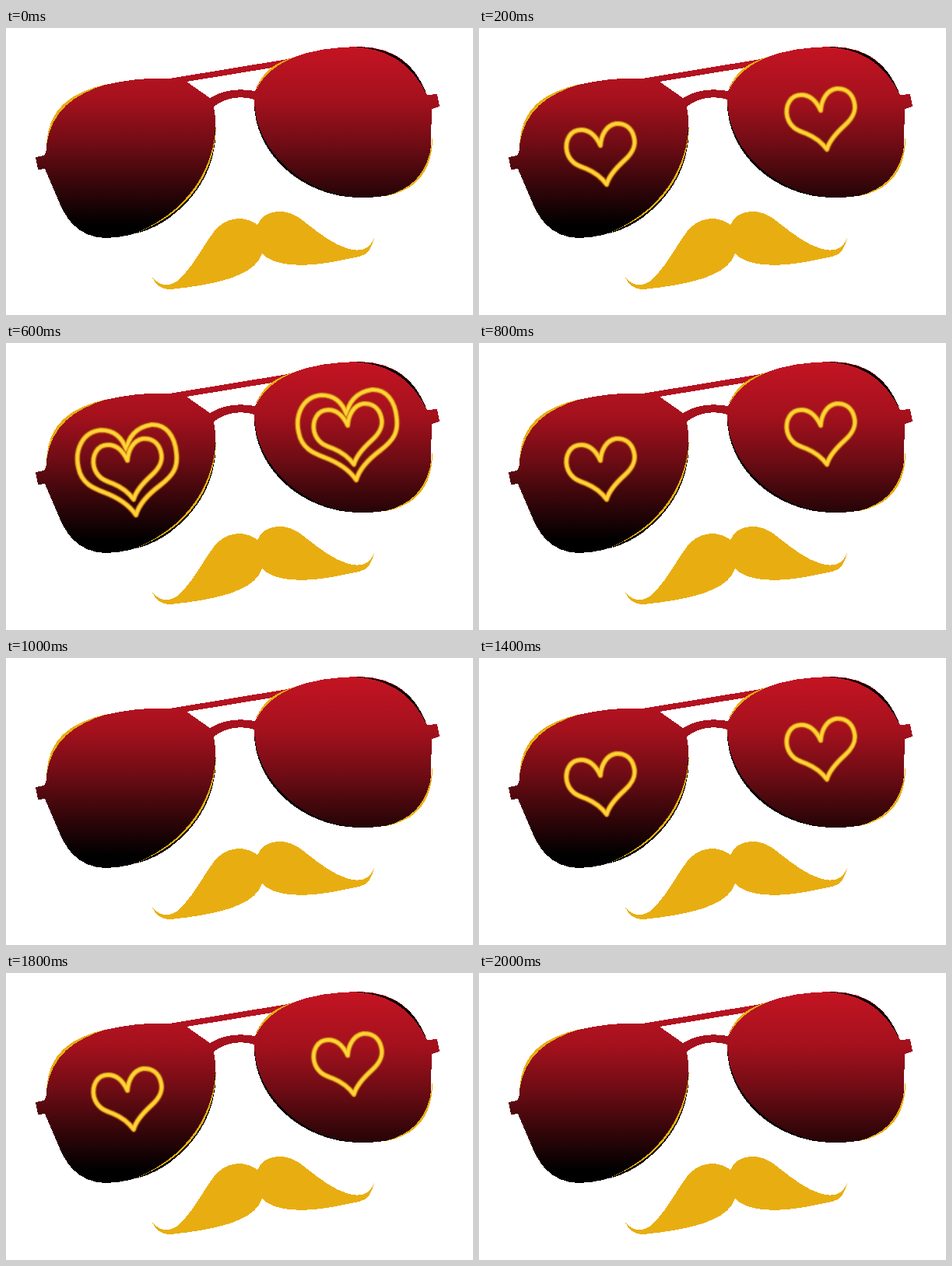
Recreate the animation shown at these times as an HTML page. Size 600x369 px, loop 2200 ms.

```html
<!DOCTYPE html>
<html lang="en">
<head>
<meta charset="utf-8">
<title>Heart sunglasses</title>
<style>
  html, body { margin: 0; width: 100%; height: 100%; overflow: hidden; background: #fff; }
  svg { display: block; width: 600px; height: 369px; }
  .gold { fill: #e8ae11; }
  .heart { fill: none; stroke-linejoin: round; }
</style>
</head>
<body>
<svg viewBox="0 0 600 369">
  <defs>
    <linearGradient id="tint" gradientUnits="userSpaceOnUse" x1="0" y1="24" x2="0" y2="254">
      <stop offset="0" stop-color="#c41423"/>
      <stop offset=".3" stop-color="#a4111d"/>
      <stop offset=".55" stop-color="#6e0c14"/>
      <stop offset=".7" stop-color="#47080d"/>
      <stop offset="1" stop-color="#000"/>
    </linearGradient>
    <path id="smallShape" d="M156 151 C150 138 142 131 131 131 C117 131 110 145 113 159 C117 174 128 177 138 181 C150 186 158 193 164 201 C167 190 176 180 187 170 C198 160 202 151 199 140 C196 128 187 122 176 123 C164 125 157 137 156 151Z"/>
    <path id="largeShape" d="M155 138 C149 120 137 112 122 112 C98 114 88 138 93 160 C97 181 113 187 126 192 C142 198 158 208 167 221 C171 207 182 195 198 183 C215 170 221 160 219 142 C217 119 205 104 187 105 C167 108 156 122 155 138Z"/>
    <g id="small" class="heart">
      <use href="#smallShape" stroke="#a85a18" stroke-opacity=".5" stroke-width="8.5"/>
      <use href="#smallShape" stroke="#ec9f1c" stroke-width="6"/>
      <use href="#smallShape" stroke="#ffd637" stroke-width="3.4"/>
    </g>
    <g id="large" class="heart">
      <use href="#largeShape" stroke="#a85a18" stroke-opacity=".5" stroke-width="8.5"/>
      <use href="#largeShape" stroke="#ec9f1c" stroke-width="6"/>
      <use href="#largeShape" stroke="#ffd637" stroke-width="3.4"/>
    </g>
  </defs>

  <g shape-rendering="crispEdges">
    <!-- frame and lenses, with the gap between the bars cut out -->
    <path fill="url(#tint)" fill-rule="evenodd" d="M38 166 L48 164 Q52 162 52 152 C54 104 82 83 128 73 C157 66 184 64 210 65 L362 40 C392 28 424 24 455 24 C503 25 527 50 541 86 L554 85 L557 101 L547 104 L546 145 C546 187 525 218 460 218 C380 218 318 160 319 92 C304 87 284 88 267 101 C277 158 258 208 210 244 C182 262 153 270 127 270 C99 269 82 253 71 230 L50 181 L41 182Z
      M232 69 L262 90 C282 78 301 78 320 81 C325 68 331 58 342 51Z"/>
    <!-- dark rims -->
    <path d="M319 95 C318 160 380 218 455 218 C384 215 321 160 319 95Z"/>
    <path d="M269 120 C273 168 253 212 210 244 C195 255 180 261 163 266 C240 238 270 180 269 120Z"/>
    <path d="M445 24 C503 24 527 50 541 86 C524 53 500 27 445 24Z"/>
    <!-- gold rims -->
    <path class="gold" d="M52 150 C54 104 82 83 130 72 C86 86 59 106 52 150Z"/>
    <path class="gold" d="M270 124 C270 180 240 238 163 265 C235 237 267 180 270 124Z"/>
    <path class="gold" d="M548 138 C549 180 530 210 484 217 C526 207 545 182 548 138Z"/>
    <path class="gold" d="M321 81 C327 58 345 44 372 37 C350 45 329 61 321 81Z"/>
    <!-- moustache -->
    <path class="gold" d="M323 253 C305 240 282 243 267 262 C249 287 237 312 219 326 C208 334 196 330 188 321 C193 331 201 337 212 336 C258 331 319 322 329 290 C342 304 370 306 396 304 C418 302 437 297 454 294 C465 291 470 283 473 270 C467 285 456 288 440 284 C416 277 393 256 378 245 C359 231 331 233 323 253Z"/>
  </g>

  <g id="largePair"><use href="#large"/><use href="#large" x="283" y="-45"/></g>
  <g id="smallPair"><use href="#small"/><use href="#small" x="283" y="-45"/></g>
</svg>
<script>
  const STEP = 200;
  const heartsPerStep = [0, 1, 2, 2, 1, 0, 0, 1, 2, 1, 0];
  const show = (id, on) =>
    document.getElementById(id).setAttribute("visibility", on ? "visible" : "hidden");

  function draw(now) {
    const hearts = heartsPerStep[Math.floor(now / STEP) % heartsPerStep.length];
    show("smallPair", hearts > 0);
    show("largePair", hearts > 1);
    requestAnimationFrame(draw);
  }
  draw(0);
</script>
</body>
</html>
```
